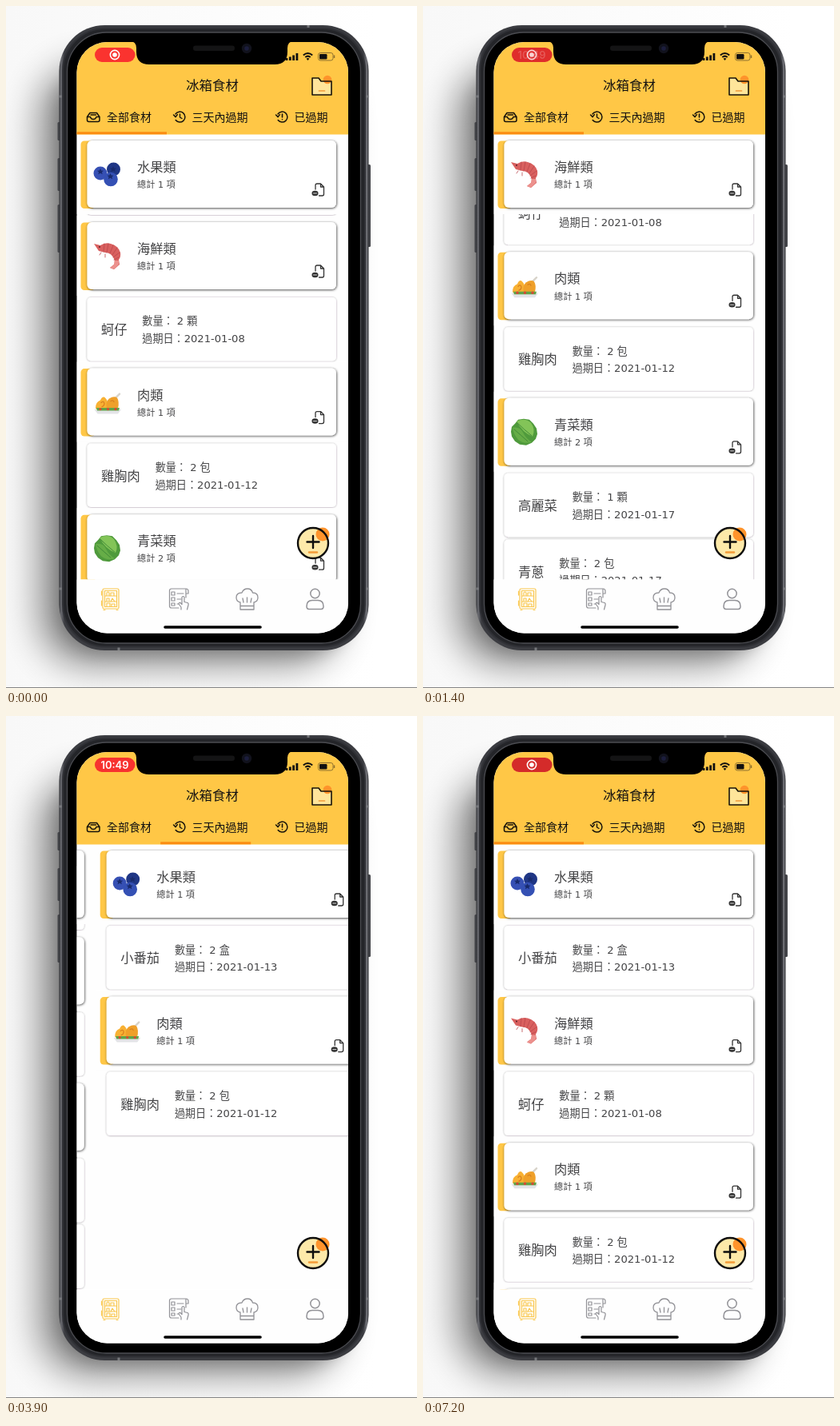
Write an HTML page that moves like this. It is 514x852 px and loops after 7.3 s.

```html
<!DOCTYPE html>
<html lang="zh-Hant">
<head>
<meta charset="utf-8">
<title>冰箱食材</title>
<style>
html, body { margin: 0; width: 100%; height: 100%; overflow: hidden; background: #fff; }
svg { display: block; width: 514px; height: 852px; }
text { font-family: 'DejaVu Sans', 'Noto Sans CJK TC', sans-serif; fill: #444446; }
.line { fill: none; stroke-linecap: round; stroke-linejoin: round; }
.big { font-size: 16.3px; }
.mid { font-size: 13.1px; }
.small { font-size: 11.2px; }
.tab { font-size: 14px; font-weight: 500; fill: #111; }
.title { font-size: 16.4px; font-weight: 500; fill: #111; }
.clock { font: 600 13px Inter, sans-serif; fill: #fff; }
</style>
</head>
<body>
<svg viewBox="0 0 514 852">
  <defs>
    <linearGradient id="wall"><stop offset="0" stop-color="#f8f8f8"/><stop offset=".9" stop-color="#fff"/></linearGradient>
    <linearGradient id="steel">
      <stop offset="0" stop-color="#2b2c30"/><stop offset=".006" stop-color="#6b6c72"/>
      <stop offset=".017" stop-color="#3b3c41"/><stop offset=".983" stop-color="#3b3c41"/>
      <stop offset=".994" stop-color="#74757b"/><stop offset="1" stop-color="#2b2c30"/>
    </linearGradient>
    <filter id="soft" x="-40%" y="-20%" width="180%" height="140%"><feGaussianBlur stdDeviation="23"/></filter>
    <filter id="near" x="-20%" y="-20%" width="140%" height="140%"><feGaussianBlur stdDeviation="9"/></filter>
    <filter id="cardShade" x="-5%" y="-15%" width="110%" height="130%"><feDropShadow dx=".6" dy=".8" stdDeviation="1.4" flood-opacity=".75"/></filter>
    <filter id="itemShade" x="-5%" y="-15%" width="110%" height="130%"><feDropShadow dx="0" dy=".3" stdDeviation="1.1" flood-color="#201020" flood-opacity=".42"/></filter>
    <clipPath id="screen"><rect x="88.5" y="45" width="339.5" height="738.5" rx="38"/></clipPath>
    <clipPath id="view"><rect x="88.5" y="160.5" width="339.5" height="556"/></clipPath>

    <g id="fruit">
      <circle cx="134.500" cy="36" r="8.500" fill="#1f3685"/>
      <circle cx="118" cy="41" r="8.500" fill="#3650b4"/>
      <circle cx="131" cy="48.500" r="8.800" fill="#3450b4"/>
      <g fill="#182a6c"><path id="star" d="M134 32l1.200 2.500 2.800.2-2 1.800.6 2.800-2.600-1.500-2.600 1.500.6-2.800-2-1.800 2.800-.2z"/>
      <use href="#star" x="-16" y="3"/><use href="#star" x="-3.500" y="9"/></g>
    </g>
    <g id="sea">
      <path d="M110 27L118 29Q124 25 131 27Q141 30 143 38Q144 43 141 47L142 53L135 59L130 57L135 53Q137 48 134 44Q131 38 124 38L116 36Z" fill="#d9605f"/>
      <path d="M141 48l0 5-6 6-5-2 5-4 1-5z" fill="#ec918d"/>
      <path class="line" d="M123 27l-1 10M128 27l-2 11M134 29l-4 10M139 32l-6 9M142 38l-8 6M141 44l-6 3M119 38l-2 3M124 40l0 4" stroke="#b9474c" stroke-width=".8"/>
      <circle cx="117" cy="31" r="1" fill="#5b2228"/>
    </g>
    <g id="meat">
      <path class="line" d="M137 37l5-5" stroke="#d8d4cb" stroke-width="2.500"/>
      <path d="M112 50Q112 42 118 40Q120 35 123 36Q127 39 127 44L130 51H113Z" fill="#f8b133"/>
      <path d="M126 51Q124 42 129 38Q135 34 139 37Q142 42 140 50Z" fill="#efa02a"/>
      <path class="line" d="M119 43q3-3 4 1q0 3-3 4M131 41q3-2 4 1" stroke="#d98220" stroke-width="1.300"/>
      <path d="M110.500 51.500h33.500l-4 5.500h-25.500z" fill="#e3e4e7"/>
      <path d="M113 49.500h29l-1 3.500h-27z" fill="#5fa548"/>
      <g fill="#d94936"><circle cx="118" cy="51" r="1.700"/><circle cx="127.500" cy="51" r="1.700"/><circle cx="137" cy="51" r="1.700"/></g>
    </g>
    <g id="greens">
      <path d="M111 36l4-4 4-5 7-1 7 1 5 5 4 6 1 7-2 6-5 5-7 3-8-1-6-4-4-6-1-6z" fill="#4f9a3c"/>
      <path d="M117 29q11-5 18 2q6 8 2 17q-13-5-20-19z" fill="#83c458"/>
      <path d="M112 37q9-2 13 6q4 8 11 12q-10 3-17-3q-6-7-7-15z" fill="#66ad47"/>
      <path class="line" d="M118 31q8 8 18 16M114 39q8 7 17 15" stroke="#3d8636" stroke-width=".9"/>
    </g>
    <g id="doc" class="line" stroke="#333" stroke-width="1.300">
      <path d="M387 61v-5q0-2 2-2h4.500l4 4v9q0 2-2 2h-4M393.500 54v4h4"/>
      <ellipse cx="386.500" cy="66" rx="3.400" ry="2.600" fill="#333"/>
      <path d="M384.500 66h4" stroke="#fff" stroke-width=".8"/>
    </g>
    <g id="rewind" class="line" stroke="#17130a" stroke-width="1.500">
      <path d="M-5.500 -3.500A6.500 6.500 0 1 1 -5.300 4"/><path d="M-8 -2.500l2.600 2.600 2.300-3" />
    </g>
  </defs>

  <rect width="514" height="852" fill="url(#wall)"/>
  <rect x="42" y="75" width="375" height="748" rx="60" filter="url(#soft)" opacity=".46"/>
  <rect x="62" y="70" width="375" height="742" rx="60" filter="url(#near)" opacity=".14"/>
  <path d="M0 851.500H514" stroke="#858585"/>

  <g fill="#45464b">
    <rect x="64.500" y="145" width="4" height="23" rx="1.500"/><rect x="64.500" y="190" width="4" height="41" rx="1.500"/>
    <rect x="64.500" y="248" width="4" height="60" rx="1.500"/><rect x="452" y="198" width="4" height="103" rx="1.500"/>
  </g>
  <rect x="66.500" y="24" width="387" height="781" rx="57" fill="url(#steel)"/>
  <path d="M66.500 113h10M66.500 728h10M443.500 113h10M443.500 728h10M141 797v8M378 24v8" stroke="#77787c" stroke-width="3"/>
  <rect x="71" y="28" width="378" height="772.500" rx="53" fill="#242529" stroke="#303136" stroke-width="2"/>
  <rect x="76.500" y="33" width="367" height="763" rx="49" fill="#000" stroke="#4b4c51" stroke-width="1.300"/>

  <g clip-path="url(#screen)">
    <rect x="88" y="45" width="341" height="739" fill="#fefefe"/>
    <g clip-path="url(#view)"><g id="pages"></g></g>

    <circle cx="384" cy="671" r="19" fill="#fde9a9"/>
    <circle cx="396" cy="660" r="8.500" fill="#ff932b"/>
    <circle cx="384" cy="671" r="19" fill="none" stroke="#0d0d0d" stroke-width="2.400"/>
    <g class="line" stroke-width="2.400"><path d="M376.500 669.500h15M384 662v15" stroke="#0d0d0d"/><path d="M379 682.500h10" stroke="#f39b37"/></g>

    <rect x="88" y="716.500" width="341" height="68" fill="#fefefe"/>
    <g class="line" stroke="#fac84f" stroke-width="1.200">
      <rect x="121" y="728" width="20" height="25" rx="1.500"/><rect x="123.500" y="730.500" width="15" height="20"/>
      <path d="M119.500 731v5M119.500 743v6M123.500 737h15M123.500 744h15M126 737v-4q1.500-2 3 0v4M131 737v-4h4v4M126 744v-4h3v4M131 744l2-4 3 4M126 750v-4h4v4M132 750v-3h4v3M122 754.500h2M138 754.500h2"/>
    </g>
    <g class="line" stroke="#929297" stroke-width="1.200">
      <path d="M216 752h-9q-2.500 0-2.500-2.500v-19q0-2.500 2.500-2.500h18v11M225 728q3 0 3 3v3h-3"/>
      <path d="M207 732h4v4h-4zM207 739h4v4h-4zM207 746h4v3h-4zM214 734h8M214 741h5M214 747h2"/>
      <path d="M219 754v-3l-3-4q0-2 2-1.500l2 2v-9q1.500-2 3 0v6l4 1q1.500.500 1 3l-1.500 5.500"/>
    </g>
    <g class="line" stroke="#929297" stroke-width="1.300">
      <path d="M293 754v-9q-5-1-5-6q0-6 7-6q2-5 7-5t6.500 5q6.500 0 6.500 6q0 5-5 6v9zM293 749.500h17M297 745l-1-5M301.500 745v-6M306 745l1-5"/>
    </g>
    <g class="line" stroke="#929297" stroke-width="1.500">
      <circle cx="386.500" cy="734" r="5.700"/><path d="M376 750q0-7.500 7-7.500h7q7 0 7 7.500q0 3.500-3 3.500h-15q-3 0-3-3.500z"/>
    </g>
    <path class="line" d="M199 776h119" stroke="#000" stroke-width="3.600"/>

    <rect x="88" y="44" width="341" height="116.500" fill="#ffc746"/>
    <text class="title" x="258" y="105" text-anchor="middle">冰箱食材</text>
    <path d="M383 90h8l3 4h13v17h-24z" fill="#ffe59a"/><circle cx="402" cy="92" r="5.300" fill="#ff932b"/>
    <path class="line" d="M383 90h8l3 4h13v17h-24z" stroke="#17130a" stroke-width="1.600"/><path class="line" d="M391.500 106h7" stroke="#f39b37" stroke-width="1.700"/>
    <g class="line" stroke="#17130a" stroke-width="1.500"><path d="M105 133.500h8.500l3.500 5v4q0 2-2 2h-11.500q-2 0-2-2v-4zM101.500 138.500h4q.5 3 3.700 3t3.700-3h4M106 136h6.500"/></g>
    <use href="#rewind" x="217.500" y="138.500"/><path class="line" d="M217.500 135v4l2.500 1.500" stroke="#17130a" stroke-width="1.400"/>
    <use href="#rewind" x="345.500" y="138.500"/><path class="line" d="M345.500 135v4M345.500 141.700v.1" stroke="#17130a" stroke-width="1.600"/>
    <text class="tab" x="126" y="144">全部食材</text>
    <text class="tab" x="232.500" y="144">三天內過期</text>
    <text class="tab" x="360.500" y="144">已過期</text>
    <rect id="bar" y="157.300" width="113" height="3" fill="#fb8c12"/>

    <rect id="pill" x="111" y="52" width="50.500" height="18" rx="9"/>
    <g id="rec"><circle cx="136" cy="61" r="5.600" fill="none" stroke="#fff" stroke-width="1.600"/><circle cx="136" cy="61" r="2.800" fill="#fff"/></g>
    <text id="clock" class="clock" x="136" y="65.500" text-anchor="middle">10:49</text>
    <path d="M351 68v-3M355.300 68v-4.500M359.600 68v-6.500M363.900 68v-9" stroke="#111" stroke-width="2.800"/>
    <path d="M371.800 61.500q5.700-5 11.400 0M374.300 64q3.200-2.800 6.400 0" fill="none" stroke="#111" stroke-width="2"/><path d="M375.600 65.800q1.900-1.400 3.800 0l-1.900 2.200z" fill="#111"/>
    <rect x="390.500" y="58.500" width="18.500" height="9.500" rx="2.700" fill="none" stroke="#8d712f"/><rect x="392" y="60" width="9.500" height="6.500" rx="1.300" fill="#111"/><path d="M410.500 61.500v3.500" stroke="#8d712f" stroke-width="1.500"/>
  </g>
  <path d="M155 43.500q8 1 8 9v4.500q0 16 16 16h157q16 0 16-16v-4.500q0-8 8-9z" fill="#000"/>
  <rect x="234" y="49.500" width="52" height="6.500" rx="3.200" fill="#141415"/>
  <circle cx="301" cy="53" r="6.200" fill="#11121c"/><circle cx="301" cy="53" r="2.800" fill="#1b1d3c"/>
</svg>
<script>
const LOOP = 7300, TOP = 160, HEAD = 100, ROW = 82.6, WIDTH = 339.5, SCROLL_END = 257;
const $ = id => document.getElementById(id);

const foods = {
  fruit: ['水果類', ['小番茄', '2 盒', '13']],
  sea: ['海鮮類', ['蚵仔', '2 顆', '08']],
  meat: ['肉類', ['雞胸肉', '2 包', '12']],
  greens: ['青菜類', ['高麗菜', '1 顆', '17'], ['青蔥', '2 包', '17']]
};
const tabs = [['fruit', 'sea', 'meat', 'greens'], ['fruit', 'meat'], ['sea']];

const label = (cls, x, y, s) => `<text class="${cls}" x="${x}" y="${y}">${s}</text>`;

// Coordinates inside rows and heads are relative to the top of the card.
function rowMarkup([name, count, day]) {
  const x = 137.500 + name.length * 16.4;
  return `<rect x="101.500" width="311.500" height="79.500" rx="5" fill="#fff" filter="url(#itemShade)"/>` +
    label('big', 119, 46.2, name) +
    label('mid', x, 34.5, `數量： ${count}`) +
    label('mid', x, 56, `過期日：2021-01-${day}`);
}

function headMarkup(key) {
  const [name, ...rows] = foods[key];
  return `<rect x="88" y="-8" width="341" height="${HEAD}" fill="#fefefe"/>
    <rect x="93.500" y=".5" width="18" height="84.500" rx="4.500" fill="#ffc746"/>
    <rect x="101.500" width="311.500" height="84" rx="6" fill="#fff" filter="url(#cardShade)"/>
    <use href="#${key}"/><use href="#doc"/>` +
    label('big', 164, 39, name) + label('small', 164, 59.3, `總計 ${rows.length} 項`);
}

function group(parent, markup = '') {
  const g = document.createElementNS('http://www.w3.org/2000/svg', 'g');
  g.innerHTML = markup;
  return parent.appendChild(g);
}

const move = (el, x, y) => el.setAttribute('transform', `translate(${x} ${y})`);

const pages = tabs.map(keys => {
  const root = group($('pages')), list = group(root), heads = group(root);
  let y = TOP;
  const sections = keys.map(key => {
    const start = y;
    y += HEAD;
    for (const row of foods[key].slice(1)) {
      move(group(list, rowMarkup(row)), 0, y + 2);
      y += ROW;
    }
    return { start, end: y, head: group(heads, headMarkup(key)) };
  });
  return { root, list, sections };
});

function scrollPage({ list, sections }, offset) {
  move(list, 0, -offset);
  for (const { start, end, head } of sections) {
    const stuck = Math.max(TOP, start - offset);
    move(head, 0, Math.min(stuck, end - offset - HEAD) + 8);
  }
}

const clamp = v => Math.min(1, Math.max(0, v));
const span = (t, from, length) => clamp((t - from) / length);
const ease = u => u * u * (3 - 2 * u);

function scrollAt(t) {
  if (t > 4500) return 0;
  return 80.5 + (SCROLL_END - 80.5) * (1 - Math.pow(1 - span(t, 0, 1900), 1.3));
}

function draw(t) {
  const pos = ease(span(t, 3650, 300)) + ease(span(t, 5050, 300)) - 2 * ease(span(t, 6450, 300));
  pages.forEach((page, i) => {
    move(page.root, (i - pos) * WIDTH, 0);
    scrollPage(page, i ? 0 : scrollAt(t));
  });
  $('bar').setAttribute('x', 88 + pos * 113.3);

  const glow = .5 + .5 * Math.cos(t / 2050 * 2 * Math.PI);
  $('pill').setAttribute('fill', `rgb(${212 + 38 * glow},${43 + 8 * glow},${42 + 5 * glow})`);
  const time = span(t, 1350, 250) - span(t, 6500, 250);
  $('clock').setAttribute('opacity', time);
  $('rec').setAttribute('opacity', 1 - time);
}

function tick() {
  draw(performance.now() % LOOP);
  requestAnimationFrame(tick);
}
tick();
</script>
</body>
</html>
```
